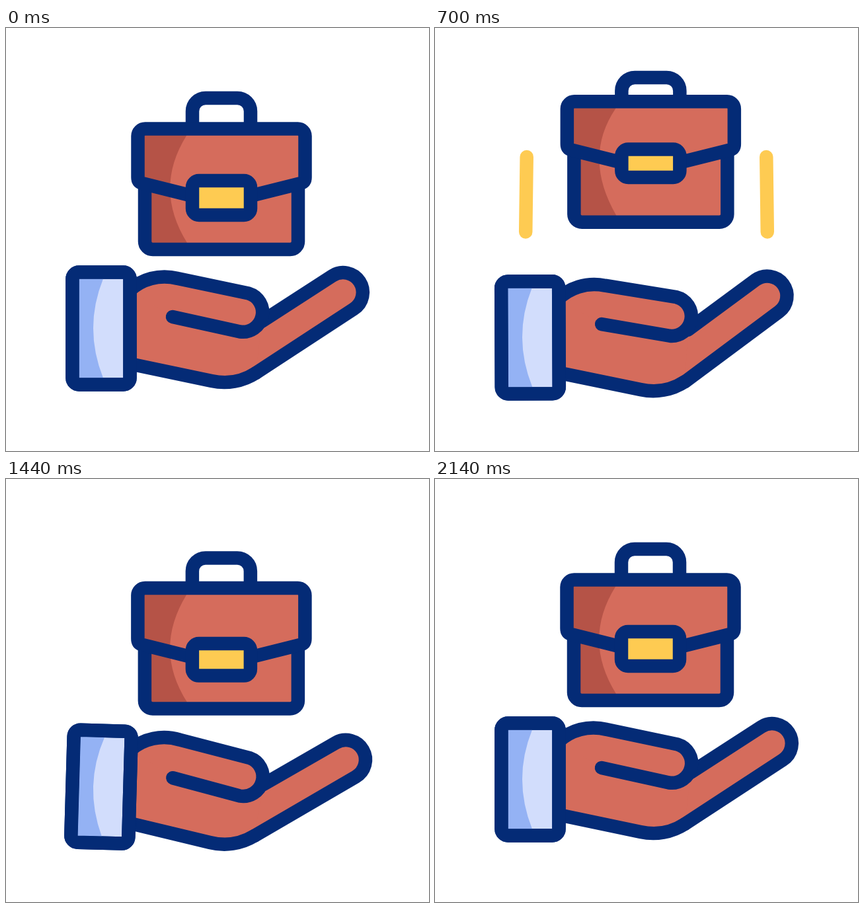
These frames come from a looping animation (640 px wide and 640 px high, 2.6 s). An HTML page with a canvas:

```html
<!DOCTYPE html>
<html>
<head>
<meta charset="utf-8">
<style>
  html, body { margin: 0; width: 100%; height: 100%; overflow: hidden; background: #fff; }
  canvas { display: block; }
</style>
</head>
<body>
<canvas id="stage" width="640" height="640"></canvas>
<script>
const ctx = document.getElementById('stage').getContext('2d');
const LOOP = 2600;
const NAVY = '#042b76', SKIN = '#d56c5c', SHADE = '#b55347', GOLD = '#fecb52';

const ramp = (t, a, b) => {
  const u = Math.min(1, Math.max(0, (t - a) / (b - a)));
  return (1 - Math.cos(Math.PI * u)) / 2;
};

// Swings from rest through the given [time, value] turning points.
function swing(t, ...points) {
  let value = 0, last = [0, 0];
  for (const point of points) {
    value += (point[1] - last[1]) * ramp(t, last[0], point[0]);
    last = point;
  }
  return value;
}

const handDrop = t => swing(t, [140, -10], [530, 31], [900, -8], [1320, 15], [1680, 0]);
const handTurn = t => swing(t, [140, -2.4], [530, 7.2], [816, -4.2], [1320, 2.2], [1680, 0]);
const fingerBend = t => swing(t, [140, -2.7], [530, 4], [850, -9.1], [1320, 1.8], [1680, 0]);
const bagLift = t => swing(t, [140, 15], [520, -46], [770, 60], [920, 62], [1340, -21], [1680, 21], [2040, 0]);

// The bag tips a moment after it moves, less so on the way down.
function bagTilt(t) {
  const lift = bagLift(t - 30);
  return lift / (lift > 0 ? 55 : 110);
}

function fill(d, color) {
  ctx.fillStyle = color;
  ctx.fill(new Path2D(d));
}

function line(d, color = NAVY) {
  ctx.strokeStyle = color;
  ctx.stroke(new Path2D(d));
}

function box(x, y, w, h, color) {
  const path = new Path2D();
  path.roundRect(x, y, w, h, 10);
  if (color) {
    ctx.fillStyle = color;
    ctx.fill(path);
  }
  ctx.strokeStyle = NAVY;
  ctx.stroke(path);
}

function turned(x, y, degrees, draw) {
  ctx.save();
  ctx.translate(x, y);
  ctx.rotate(degrees * Math.PI / 180);
  ctx.translate(-x, -y);
  draw();
  ctx.restore();
}

const PALM = 'M187 508L311 534C334 539 358 535 378 522';
const FINGER = 'M387 444L493.7 375A29.8 29.8 0 0 1 526.3 425L378 522';
const THUMB = 'M187 397C205 380 232 372 260 379L367 401.5A29.8 29.8 0 0 1 354 459.5L252 437';

function hand(bend) {
  const finger = draw => turned(382, 521, bend, draw);
  const thumb = draw => turned(197, 431, bend * .75, draw);
  fill(PALM + 'L395 508V447H380L250 400H187Z', SKIN);
  finger(() => fill(FINGER, SKIN));
  thumb(() => fill(THUMB, SKIN));
  line(PALM);
  finger(() => line(FINGER));
  thumb(() => line(THUMB));

  box(100.5, 369.5, 87, 170, '#d2ddfc');
  fill('M110.5 379.5H147Q117 454 147 529.5H110.5Z', '#94b2f4');
  box(100.5, 369.5, 87, 170);
}

// Drawn upwards from its bottom edge at y = 0.
function bag(tilt) {
  const top = -192.5, flap = -112 - 21 * tilt;
  const handle = top - 46.5 + 23.5 * (tilt > 0 ? tilt : -tilt / 4);
  const claspH = 52 - 22 * Math.abs(tilt), claspY = -88 - 25 * tilt;

  line(`M282 ${top}V${handle + 20}A20 20 0 0 1 302 ${handle}H350A20 20 0 0 1 370 ${handle + 20}V${top}`);
  fill(`M207 ${top}H445V-10H207Z`, SKIN);
  fill(`M207 ${top}H268L273 -182Q223 ${-102 - 14 * tilt} 274 -20V-10H207Z`, SHADE);
  line(`M210 ${flap + 4}V-22A12 12 0 0 0 222 -10H430A12 12 0 0 0 442 -22V${flap + 4}`);
  line(`M278 ${flap + 20}L206 ${flap + 2}Q199.5 ${flap} 199.5 ${flap - 7}V${top + 11}` +
    `A11 11 0 0 1 210.5 ${top}H441.5A11 11 0 0 1 452.5 ${top + 11}` +
    `V${flap - 7}Q452.5 ${flap} 446 ${flap + 2}L374 ${flap + 20}`);
  box(282, claspY - claspH / 2, 88, claspH, GOLD);
}

function streaks(t) {
  const head = ramp(t, 570, 690), tail = ramp(t, 710, 880);
  if (head <= tail) return;
  for (const side of [-1, 1]) {
    const at = u => `${320 + side * (182.8 - 1.5 * u)} ${308.5 - 113.5 * u}`;
    line(`M${at(tail)}L${at(head)}`, GOLD);
  }
}

function frame(t) {
  const tilt = bagTilt(t);
  ctx.fillStyle = '#fff';
  ctx.fillRect(0, 0, 640, 640);
  ctx.lineWidth = 20.5;
  ctx.lineCap = ctx.lineJoin = 'round';

  streaks(t);
  ctx.save();
  ctx.translate(0, handDrop(t));
  turned(144, 454, handTurn(t), () => hand(fingerBend(t)));
  ctx.restore();

  ctx.save();
  ctx.translate(.8 * tilt, 345 - bagLift(t));
  bag(tilt);
  ctx.restore();
}

const start = performance.now();
function tick() {
  frame((performance.now() - start) % LOOP);
  requestAnimationFrame(tick);
}
tick();
</script>
</body>
</html>
```
